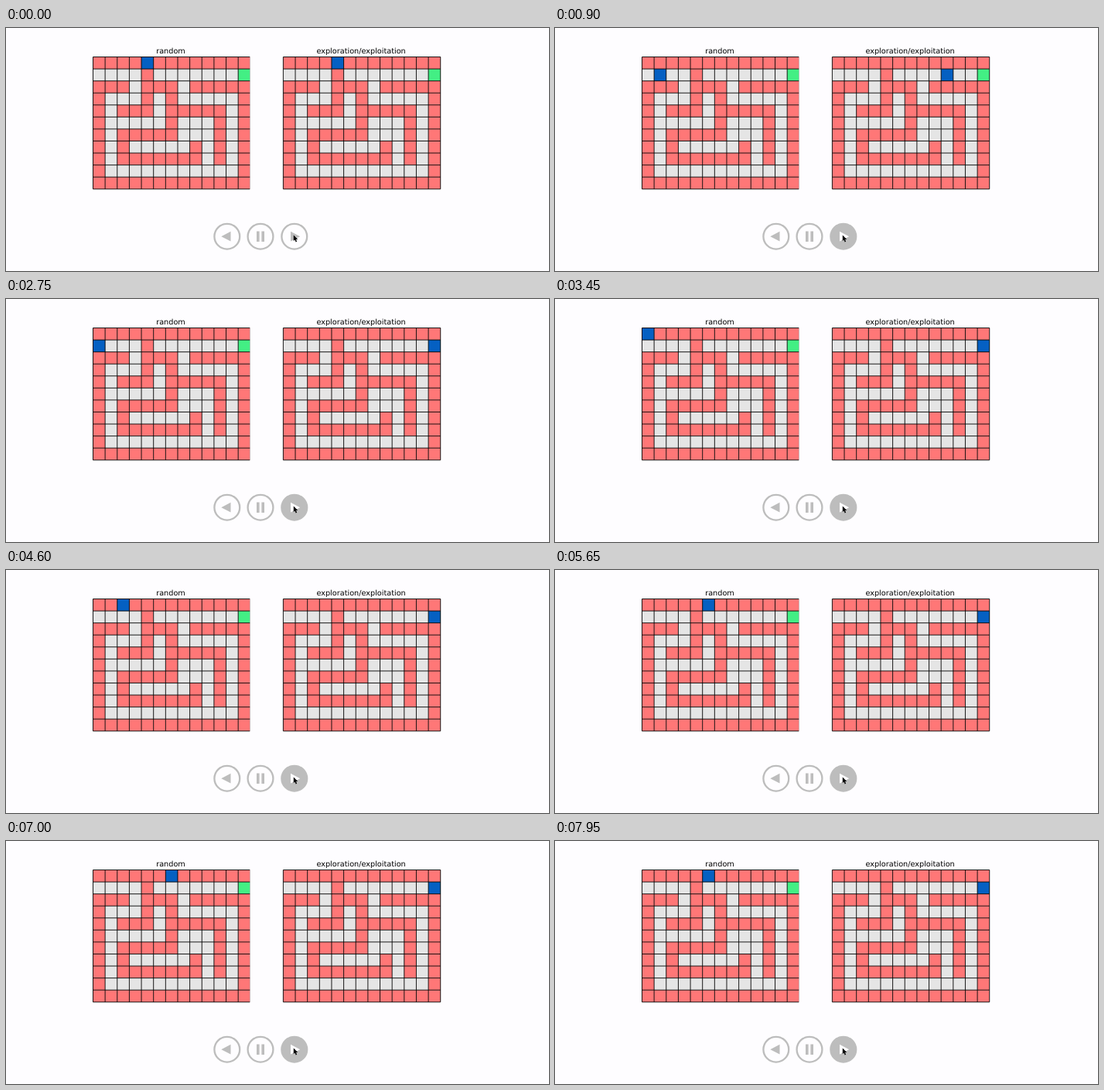
An HTML page that plays this animation: 702 px wide and 315 px high, repeating every 8000 ms.

```html
<!DOCTYPE html>
<html lang="en">
<head>
<meta charset="utf-8">
<title>Maze walk</title>
<style>
  html, body { margin: 0; width: 100%; height: 100%; overflow: hidden; background: #fefdff; }
  svg { display: block; }
  text { font: 9.7px "DejaVu Sans", sans-serif; text-anchor: middle; text-rendering: geometricPrecision; fill: #000; }
  .grid { fill: none; stroke: #000; stroke-width: .9; }
  .ring { fill: #fefdff; stroke: #bdbdbd; stroke-width: 2.3; }
  .icon { fill: #bdbdbd; }
  .pressed .ring { fill: #bdbdbd; }
  .pressed .icon { fill: #fefdff; }
</style>
</head>
<body>
<svg width="702" height="315" viewBox="0 0 702 315">
  <clipPath id="crop"><rect width="315.3" height="315"/></clipPath>
  <text x="213" y="33">random</text>
  <text x="459.1" y="33">exploration/exploitation</text>
  <g id="left" clip-path="url(#crop)"></g>
  <g id="right"></g>
  <g>
    <circle class="ring" cx="285.8" cy="270.2" r="16.4"/>
    <path class="icon" d="M278.3 270.2L290.5 263.8V276.6Z"/>
  </g>
  <g>
    <circle class="ring" cx="329" cy="270.2" r="16.4"/>
    <path class="icon" d="M324 263.5h3.6v13.5h-3.6zM330.4 263.5h3.6v13.5h-3.6z"/>
  </g>
  <g id="play">
    <circle class="ring" cx="372.8" cy="270.2" r="16.4"/>
    <path class="icon" d="M380.2 270.2L368 263.8V276.6Z"/>
  </g>
  <path d="M371.8 268.5v7.6l1.7-1.5 1.2 2.8 1.4-.6-1.2-2.7h2.3Z"/>
</svg>
<script>
const LOOP = 8000, STEP = 150, PRESS = 50;
const COLS = 13, ROWS = 11, CELL_W = 15.64, CELL_H = 15.57, TOP = 37.5;
const COLORS = { '#': '#ff7777', '.': '#e5e5e5', G: '#43ef84' };
const MAZE = [
  '#############',
  '....#.......G',
  '###.###.#####',
  '#...#.#.....#',
  '#.###.#####.#',
  '#.....#...#.#',
  '#.#####...#.#',
  '#.#.....#.#.#',
  '#.#######.#.#',
  '#...........#',
  '#############'
];
const MOVES = { L: [-1, 0], R: [1, 0], U: [0, -1], D: [0, 1] };
const START = [4, 0];

function add(parent, name, attributes) {
  const node = document.createElementNS('http://www.w3.org/2000/svg', name);
  for (const key in attributes) node.setAttribute(key, attributes[key]);
  return parent.appendChild(node);
}

function buildMaze(id, left) {
  const group = document.getElementById(id);
  const xAt = col => left + col * CELL_W;
  const yAt = row => TOP + row * CELL_H;
  const cell = (col, row, fill) => add(group, 'rect', {
    x: xAt(col), y: yAt(row), width: CELL_W, height: CELL_H, fill
  });
  MAZE.forEach((line, row) => [...line].forEach((kind, col) => cell(col, row, COLORS[kind])));
  const agent = cell(...START, '#0560c2');

  let lines = '';
  for (let col = 0; col <= COLS; col++) lines += `M${xAt(col)} ${TOP}V${yAt(ROWS)}`;
  for (let row = 0; row <= ROWS; row++) lines += `M${left} ${yAt(row)}H${xAt(COLS)}`;
  add(group, 'path', { class: 'grid', d: lines });

  return ([col, row]) => {
    agent.setAttribute('x', xAt(col));
    agent.setAttribute('y', yAt(row));
  };
}

// Moves against the outer edge leave the agent in place.
function walk(route) {
  const clamp = (value, max) => Math.max(0, Math.min(max, value));
  const path = [START];
  for (const move of route) {
    const [col, row] = path[path.length - 1], [dx, dy] = MOVES[move];
    path.push([clamp(col + dx, COLS - 1), clamp(row + dy, ROWS - 1)]);
  }
  return path;
}

const agents = [
  { place: buildMaze('left', 112.5), path: walk('LDLRLL' + 'RLLDURL' + 'URLLDRULUL' + 'RURDRULRRURLUR' + 'RDRULURUL' + 'RLULDUU') },
  { place: buildMaze('right', 358.4), path: walk('RDRRRRRRR') }
];
const play = document.getElementById('play');

function draw(now) {
  const time = now % LOOP;
  const step = Math.floor((time + 20) / STEP);
  for (const { place, path } of agents) place(path[Math.min(step, path.length - 1)]);
  play.classList.toggle('pressed', time >= PRESS);
  requestAnimationFrame(draw);
}
draw(0);
</script>
</body>
</html>
```
